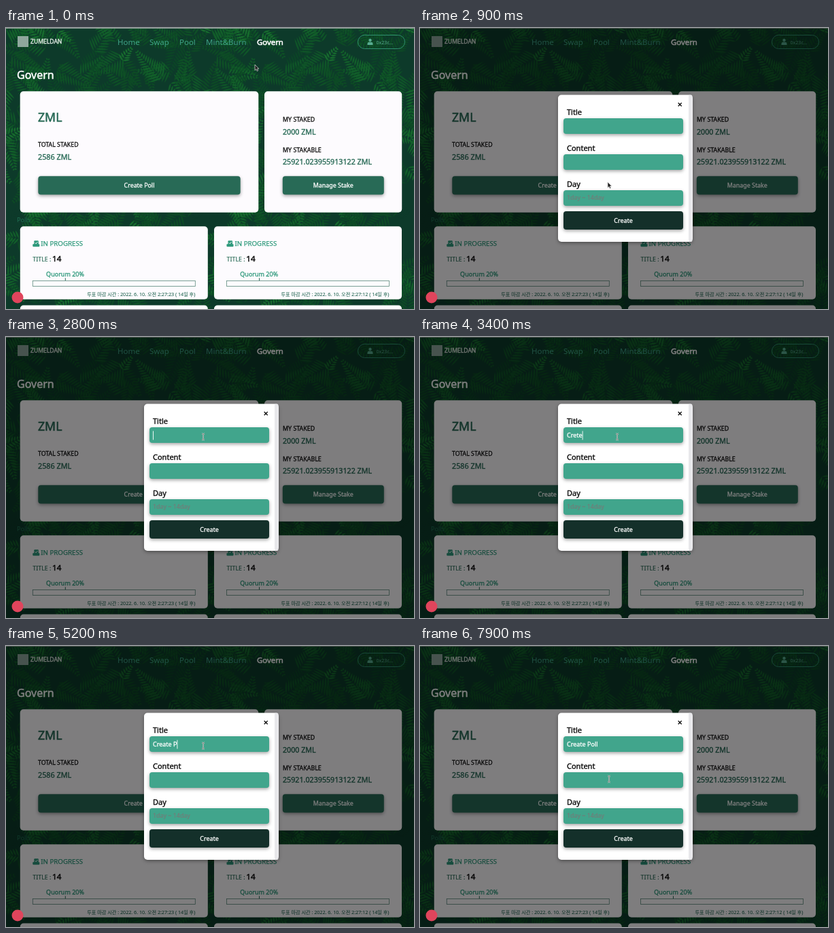
An HTML page with a canvas that plays this animation: 600x414 px, repeating every 8 s.

```html
<!DOCTYPE html>
<html lang="en">
<head>
<meta charset="utf-8">
<title>Govern</title>
<style>
html, body { margin: 0; width: 100%; height: 100%; overflow: hidden; background: #0b3a26; }
canvas, svg { position: absolute; left: 0; top: 0; width: 100vw; height: 100vh; display: block; }
text { font-family: "Noto Sans", "Noto Sans CJK KR", "Noto Sans CJK", sans-serif; white-space: pre; }
.lift { filter: drop-shadow(0 2.5px 2.5px rgba(0,0,0,.36)); }
</style>
</head>
<body>
<canvas id="leaves" width="600" height="414"></canvas>
<svg id="stage" viewBox="0 0 600 414" preserveAspectRatio="none"></svg>
<script>
const LOOP = 8000, STEP = 100;
const GREEN = '#286a56', MINT = '#41a58c', INK = '#111', PAPER = '#fdfbfe';
const BRAND = 'ZUMELDAN', TOKEN = 'ZML';

// ---------- fern backdrop ----------
function paintLeaves() {
  const g = document.getElementById('leaves').getContext('2d');
  const TILE = 302, COUNT = 260;
  let seed = 11;
  const rnd = () => (seed = (seed * 16807) % 2147483647) / 2147483647;
  g.fillStyle = '#0d3a2a';
  g.fillRect(0, 0, 600, 414);

  function leaflet(x, y, angle, len, width) {
    const c = Math.cos(angle), s = Math.sin(angle);
    g.moveTo(x, y);
    g.quadraticCurveTo(x + c * len * .4 - s * width, y + s * len * .4 + c * width, x + c * len, y + s * len);
    g.quadraticCurveTo(x + c * len * .4 + s * width, y + s * len * .4 - c * width, x, y);
  }
  // Triangular frond: leaflets shorten evenly towards the tip.
  function frond(x, y, angle, len, bend) {
    const n = Math.round(len / 4.5);
    g.beginPath();
    for (let i = 0; i < n; i++) {
      const k = i / n, a = angle + bend * k, size = len * .36 * (1 - k) + 2;
      leaflet(x, y, a + 1, size, 2.6);
      leaflet(x, y, a - 1, size, 2.6);
      x += Math.cos(a) * len / n;
      y += Math.sin(a) * len / n;
    }
    g.fill();
  }
  const tones = ['#0d3a2a', '#0b4526', '#0f5528', '#0d4a25', '#125f2a', '#0e5026', '#176c2e'];
  for (let i = 0; i < COUNT; i++) {
    const x = rnd() * TILE, y = rnd() * 430 - 8, a = rnd() * 6.28;
    const len = 24 + rnd() * 34, bend = rnd() - .5;
    g.fillStyle = tones[Math.floor(rnd() * 3 + i / COUNT * 4)];
    for (const dx of [-TILE, 0, TILE]) frond(x + dx, y, a, len, bend);
  }
}

// ---------- page pieces ----------
const box = (x, y, w, h, fill, r = 0, extra = '') =>
  `<rect x="${x}" y="${y}" width="${w}" height="${h}" rx="${r}" fill="${fill}" ${extra}/>`;

function label(x, y, size, str, fill, weight = 0, anchor = 'start', extra = '') {
  const stroke = weight ? `stroke="${fill}" stroke-width="${weight}"` : '';
  return `<text x="${x}" y="${y}" font-size="${size}" fill="${fill}" text-anchor="${anchor}" ${stroke} ${extra}>${str}</text>`;
}

const button = (x, y, w, h, fill, str) =>
  box(x, y, w, h, fill, 4, 'class="lift"') + label(x + w / 2, y + h / 2 + 3.2, 8.9, str, '#fff', .3, 'middle');

function header() {
  const links = [[164, 'Home'], [211, 'Swap'], [255, 'Pool'], [294, 'Mint&amp;Burn']];
  return box(0, 0, 600, .8, '#a3aea8') +
    box(17, 12, 16, 16, '#8fa79d') +
    label(36, 23.2, 8.6, BRAND, '#dfe8e2', .4) +
    links.map(([x, s]) => label(x, 24.5, 11.5, s, '#3fa287')).join('') +
    label(369, 24.5, 11.4, 'Govern', '#fff', .6) +
    box(517.5, 10.5, 69, 20, 'none', 10, 'stroke="#2f8f70"') +
    `<g fill="#57ab90"><circle cx="535.5" cy="18" r="2.2"/><path d="M531.5 25v-1.5q0-2.7 2.7-2.7h2.6q2.7 0 2.7 2.7V25z"/></g>` +
    label(544.5, 23.6, 7.1, '0x23c...', '#57ab90');
}

function summary() {
  return label(16, 75, 16, 'Govern', '#fff', .5) +
    box(20.7, 93.3, 350.6, 178.4, PAPER, 5) + box(380, 93.3, 202.2, 178.4, PAPER, 5) +
    label(47, 138.4, 17.7, TOKEN, GREEN, .5) +
    label(47, 175, 8.8, 'TOTAL STAKED', INK, .3) +
    label(47, 193.6, 10.8, '2586 ' + TOKEN, GREEN, .35) +
    button(47.3, 218.2, 297.4, 27.2, GREEN, 'Create Poll') +
    label(407, 138, 8.9, 'MY STAKED', INK, .3) +
    label(407, 156.7, 10.7, '2000 ' + TOKEN, GREEN, .35) +
    label(407, 182.8, 8.9, 'MY STAKABLE', INK, .3) +
    label(407, 201.2, 10.7, '25921.023955913122 ' + TOKEN, GREEN, .35) +
    button(406.8, 218.2, 149, 27.2, GREEN, 'Manage Stake') +
    label(16, 285.5, 9.2, 'Polls', '#1f6f52');
}

function poll(x, seconds) {
  const teal = '#2f9a7c';
  return `<g transform="translate(${x} 292.3)">` +
    box(0, 0, 276, 107.5, PAPER, 5) + box(0, 116.3, 276, 20, PAPER, 5) +
    box(18.5, 26, 10, 4, teal, 1) + box(20.5, 21, 6.5, 6.5, teal, 1) +
    `<path d="M22 24.2l1.3 1.4 2.4-2.8" fill="none" stroke="${PAPER}"/>` +
    label(30.5, 28.6, 9.7, 'IN PROGRESS', teal, .25) +
    label(18.5, 52.2, 8.9, 'TITLE :', GREEN, .15) +
    label(47.3, 52.2, 11.6, '14', INK, .5) +
    label(38.3, 74.2, 9, 'Quorum 20%', teal, .3) +
    box(66, 76, 1, 4, GREEN) +
    box(18.5, 80.2, 239, 8, 'none', 0, 'stroke="#5c8a7c" stroke-width=".8"') +
    label(257.5, 102.4, 7.15, `투표 마감 시간 : 2022. 6. 10. 오전 2:27:${seconds} ( 14일 후)`, GREEN, .1, 'end', 'lang="ko"') +
    '</g>';
}

function dialog() {
  const field = (y, name) =>
    label(216, y - 5.3, 11, name, INK, .4) + box(211, y, 176, 23, MINT, 4, 'class="lift"');
  return '<g id="dialog">' + box(0, 0, 600, 414, 'rgba(0,0,0,.5)') +
    box(203, 98.5, 198, 216.5, '#fff', 5, 'class="lift"') +
    box(395, 98.5, 5.5, 216.5, '#e8e8eb', 2) +
    '<path d="M379.7 110.2l5 5m0-5l-5 5" stroke="#111" stroke-width="1.4"/>' +
    field(133, 'Title') + field(186, 'Content') + field(239, 'Day') +
    label(216, 253.2, 8.9, '1day ~ 14day', '#757b78', .15) +
    button(211, 270, 176, 27, '#14302a', 'Create') +
    label(216, 148, 9, '', '#fff', .3, 'start', 'id="typed"') +
    box(0, 0, .9, 13, '#fff', 0, 'id="caret"') + '</g>';
}

const beamPath = (color, width) =>
  `<path d="M-2-4.5q2 0 2 1.2v6.6q0 1.2-2 1.2M2-4.5q-2 0-2 1.2M2 4.5q-2 0-2-1.2" stroke="${color}" stroke-width="${width}"/>`;
const pointer =
  '<g id="arrow"><path d="M0 0v8.4l1.9-1.7 1.3 2.8 1.5-.7-1.3-2.8h2.5z" fill="#222" stroke="#ddd" stroke-width=".7"/></g>' +
  `<g id="beam" fill="none">${beamPath('#dfe9e5', 1.8)}${beamPath('#4a5b55', .8)}</g>`;

paintLeaves();
document.getElementById('stage').innerHTML =
  header() + summary() + poll(20.8, 23) + poll(306, 12) + dialog() +
  '<circle cx="17" cy="397" r="8.5" fill="#e0455c"/>' + pointer;

// ---------- timeline ----------
const path = [
  [0, 366, 54], [600, 276, 227], [900, 276, 227], [1600, 290, 147], [5500, 290, 147],
  [5900, 280, 199], [6300, 278, 196], [6900, 278, 196], [7300, 289, 202], [7700, 278, 196], [LOOP, 278, 196]
];
const typing = [
  [0, ''], [2900, 'C'], [3000, 'Cr'], [3100, 'Cre'], [3200, 'Cret'], [3400, 'Crete'],
  [3800, 'Cret'], [3900, 'Cre'], [4200, 'Crea'], [4400, 'Creat'], [4600, 'Create'], [4900, 'Create '],
  [5100, 'Create P'], [5300, 'Create Po'], [5500, 'Create Pol'], [5600, 'Create Poll']
];
const caretOn = [[1800, 2200], [2800, 6100], [6300, 6800], [7300, 7800]];
const FOCUS_CONTENT = 6300, OPEN = 900;

const el = id => document.getElementById(id);
const [modal, typed, caret, arrow, beam] = ['dialog', 'typed', 'caret', 'arrow', 'beam'].map(el);
const show = (node, on) => node.setAttribute('visibility', on ? 'visible' : 'hidden');

function pointerAt(t) {
  const i = path.findIndex(p => p[0] > t);
  const [t0, x0, y0] = path[i - 1], [t1, x1, y1] = path[i];
  const u = (t - t0) / (t1 - t0), k = u * u * (3 - 2 * u);
  return [x0 + (x1 - x0) * k, y0 + (y1 - y0) * k];
}

function caretAlpha(t) {
  const span = caretOn.find(([a, b]) => t >= a && t <= b);
  return !span ? 0 : t === span[1] ? .5 : 1;
}

function draw(t) {
  const open = t >= OPEN;
  modal.style.display = open ? '' : 'none';
  const [x, y] = pointerAt(t);
  const overField = open && [133, 186, 239].some(top => y >= top && y <= top + 23);
  show(arrow, !overField);
  show(beam, overField);
  (overField ? beam : arrow).setAttribute('transform', `translate(${x} ${y})`);
  if (!open) return;

  typed.textContent = typing.filter(s => s[0] <= t).pop()[1];
  const inContent = t >= FOCUS_CONTENT;
  caret.setAttribute('x', 216 + (inContent || !typed.textContent ? 0 : typed.getComputedTextLength()));
  caret.setAttribute('y', inContent ? 191.5 : 138.5);
  caret.setAttribute('opacity', caretAlpha(t));
}

const start = performance.now();
function tick() {
  const t = (performance.now() - start) % LOOP;
  draw(Math.floor(t / STEP) * STEP);
  requestAnimationFrame(tick);
}
tick();
</script>
</body>
</html>
```
